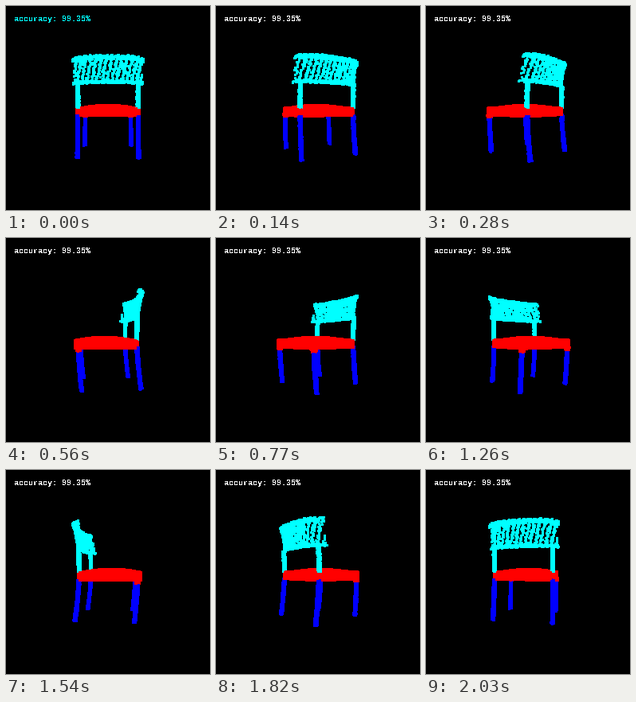
Recreate the animation shown at these times as a matplotlib script. Size 256 by 256 pixels, loop 2.1 s.

```python
import matplotlib.pyplot as plt
import numpy as np
from matplotlib.animation import FuncAnimation

SIZE, DPI = 256, 64
FRAMES, INTERVAL = 30, 70
CAMERA = 231  # distance to the turning axis, in pixels at the axis
CYAN, RED, BLUE = (0, 1, 1), (1, 0, 0), (0, 0, 1)

plt.rcParams["text.hinting"] = "native"
plt.rcParams["text.hinting_factor"] = 1

rng = np.random.default_rng(7)
parts = []


def spread(n, jitter=0.25):
    """Evenly scattered pairs in the unit square, slightly shaken."""
    k = np.arange(n)[:, None] + 0.5
    shake = rng.uniform(-jitter, jitter, (n, 2)) / np.sqrt(n)
    return ((k * [0.7549, 0.5698] + shake) % 1).T


def add(x, y, z, color):
    pts = np.stack(np.broadcast_arrays(x, y, z), axis=1).astype(float)
    parts.append((pts, np.tile(color, (len(pts), 1))))


def bar(n, x, z, top, bottom, color, lean=0, power=1, r=1.3):
    """Square rod; its foot is shifted by lean along z."""
    a, t = spread(n)
    a = a * 2 * np.pi
    c, s = np.cos(a), np.sin(a)
    m = np.maximum(abs(c), abs(s))
    add(x + r * c / m, top + (bottom - top) * t,
        z + r * s / m + lean * t ** power, color)


def seat_outline(a):
    c, s = np.cos(a), np.sin(a)
    m = (abs(c) ** 16 + abs(s) ** 16) ** (1 / 16)
    return 35 * c / m, -4.5 + 34.5 * s / m


def seat():
    u, v = spread(900) * 2 - 1
    add(35 * u * 0.97, 3.8 * (1 - u**2) * (1 - v**2), -4.5 + 33.5 * v, RED)
    a, t = spread(1050)
    x, z = seat_outline(a * 2 * np.pi)
    add(x, -8.7 * t, z, RED)
    x, z = seat_outline(np.linspace(0, 2 * np.pi, 260))
    add(x, -8.7, z, RED)


def back_strip(n, low, high, half, depth=0):
    """Band of the curved, reclined backrest between two heights (0 to 1)."""
    a, b = spread(n)
    u, t = 2 * a - 1, low + (high - low) * b
    y = 26.5 + t * (28 + 0.8 * (1 - u**2))
    z = 33.5 + 5.5 * t - 11 * u**4
    add(half * u, y, z + depth * rng.uniform(-1, 1, n), CYAN)


seat()
back_strip(370, 0.1, 0.9, 38)
back_strip(330, 0.86, 1, 39.5, 0.8)
back_strip(260, 0, 0.1, 39.5, 0.8)
for side in (-33, 33):
    bar(120, side, 29, 27, 0, CYAN, lean=-1)
    bar(300, side, 28.5, -8, -54, BLUE, lean=4.5, power=1.5)
    bar(300, side, -35, -8, -54, BLUE, lean=3.5, power=1.5)
    bar(60, side, -35, -8, -12, RED, r=1.9)

points = np.concatenate([p for p, _ in parts])
colors = np.concatenate([c for _, c in parts])

fig = plt.figure(figsize=(SIZE / DPI, SIZE / DPI), dpi=DPI, facecolor="black")
ax = fig.add_axes([0, 0, 1, 1])
ax.set(xlim=(0, SIZE), ylim=(SIZE, 0))
ax.axis("off")

dot = 3 * 72 / DPI
cloud = ax.scatter([], [], s=dot**2, marker="s", linewidths=0,
                   antialiased=False)
label = ax.text(10, 19, "accuracy: 99.35%", family="Liberation Mono",
                weight="bold", size=10 * 72 / DPI, color="white",
                va="baseline", antialiased=False)


def update(i):
    angle = 2 * np.pi * i / FRAMES
    c, s = np.cos(angle), np.sin(angle)
    x, y, z = points.T
    depth = z * c - x * s
    scale = CAMERA / (CAMERA - depth)
    px = SIZE / 2 + (x * c + z * s) * scale
    py = SIZE / 2 - y * scale
    order = np.argsort(depth)
    cloud.set_offsets(np.floor(np.stack([px, py], axis=1)[order]) + 0.5)
    cloud.set_facecolor(colors[order])
    label.set_color("cyan" if i == 0 else "white")
    return cloud, label


anim = FuncAnimation(fig, update, frames=FRAMES, interval=INTERVAL,
                     repeat=True, repeat_delay=0)
plt.show()
```
